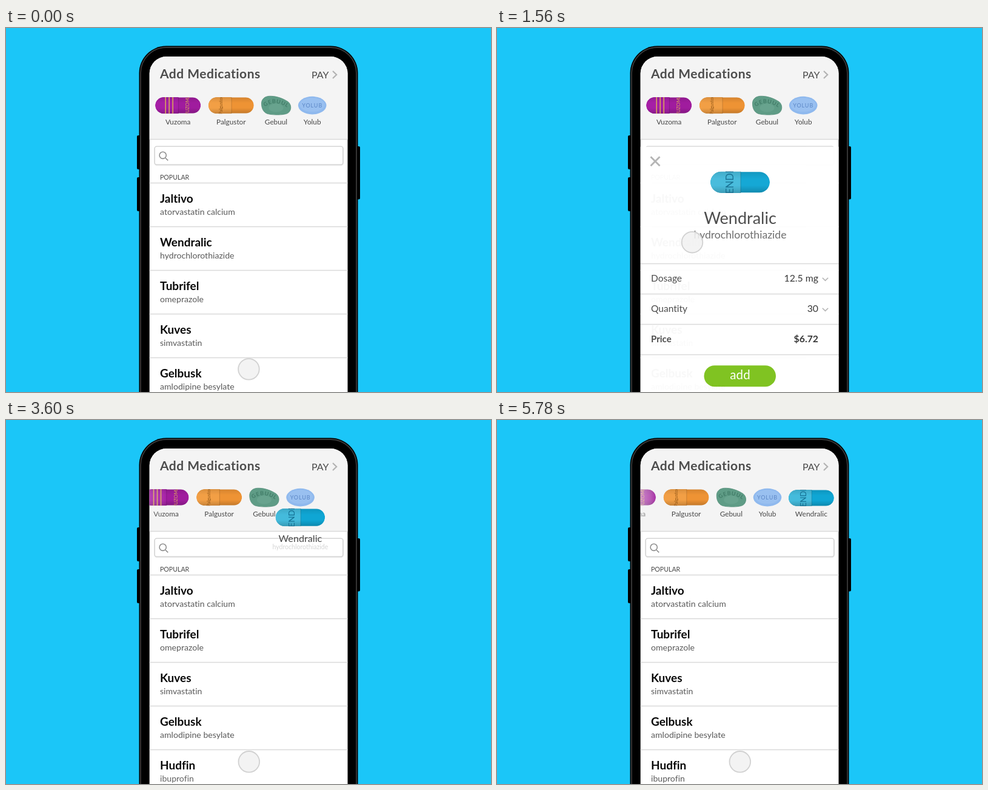
Recreate the animation shown at these times as an HTML page. Size 800 by 600 pixels, loop 5800 ms.

```html
<!DOCTYPE html>
<html lang="en">
<head>
<meta charset="utf-8">
<title>Add Medications</title>
<style>
  html, body { margin: 0; width: 100%; height: 100%; overflow: hidden; background: #1bc6f8; }
  svg { display: block; width: 100vw; height: 100vh; }
  text { font-family: Lato, "Open Sans", sans-serif; font-variant-ligatures: none; fill: #484848; }
  .bold { font-weight: 700; }
  .mid { text-anchor: middle; }
  .end { text-anchor: end; }
  .line { stroke: #d9d9d9; stroke-width: 1.5; }
  .icon { fill: none; stroke: #b3b3b3; stroke-width: 1.6; }
  .glass { stroke: #8e8e8e; }
</style>
</head>
<body>
<svg viewBox="0 0 800 600">
  <defs>
    <clipPath id="screen"><rect x="236.7" y="47" width="326.8" height="640" rx="28"/></clipPath>
    <clipPath id="capsule"><rect x="-37.5" y="-13.6" width="75" height="27.2" rx="13.6"/></clipPath>
    <linearGradient id="shade" x2="0" y2="1">
      <stop offset="0" stop-opacity=".1"/>
      <stop offset=".35" stop-opacity="0"/>
      <stop offset=".65" stop-opacity="0"/>
      <stop offset="1" stop-opacity=".18"/>
    </linearGradient>
    <linearGradient id="edge">
      <stop offset="0" stop-color="#f4f4f4" stop-opacity=".5"/>
      <stop offset=".6" stop-color="#f4f4f4" stop-opacity=".28"/>
      <stop offset="1" stop-color="#f4f4f4" stop-opacity="0"/>
    </linearGradient>
    <path id="arc" d="M-18.5 2.5Q-2 -11 20 4.5"/>
  </defs>

  <rect width="800" height="600" fill="#1bc6f8"/>
  <g>
    <rect x="216" y="177" width="9" height="56" rx="2"/>
    <rect x="216" y="246" width="9" height="56" rx="2"/>
    <rect x="575" y="195" width="9" height="87.5" rx="2"/>
    <rect x="219.5" y="29.5" width="361" height="700" rx="45"/>
    <rect x="222" y="32" width="356" height="700" rx="42.5" fill="none" stroke="#3a3a3a" stroke-width="1.8"/>
  </g>

  <g clip-path="url(#screen)">
    <rect x="236" y="47" width="328" height="553" fill="#fff"/>
    <rect id="hot" x="236" y="327.5" width="328" height="72" fill="#e8e8e8"/>
    <rect x="245.5" y="196" width="310.5" height="30" rx="3.5" fill="none" stroke="#ececec" stroke-width="2.5"/>
    <rect x="245.2" y="195.2" width="310.6" height="30" rx="3.5" fill="#fff" stroke="#cfcfcf" stroke-width="1.3"/>
    <path d="M263 214.2L267.2 218.4" class="icon glass"/>
    <circle cx="258.7" cy="209.8" r="5.6" class="icon glass"/>
    <text x="254" y="250.2" font-size="10.6">POPULAR</text>
    <g id="before"></g>
    <g id="after"></g>

    <g id="card">
      <rect x="236" y="184" width="328" height="430" fill="#fff"/>
      <path d="M253.5 200.5L268.5 215.5M268.5 200.5L253.5 215.5" class="icon" style="stroke-width:2.8"/>
      <g id="facts"></g>
      <rect id="button" x="341.5" y="544.5" width="118.5" height="35" rx="17.5"/>
      <text x="401" y="567.5" font-size="20.5" class="mid" letter-spacing=".2" style="fill:#fff">add</text>
    </g>

    <rect x="236" y="47" width="328" height="136" fill="#f4f4f4"/>
    <path d="M236 183.5H564" class="line"/>
    <text x="254" y="83" font-size="21" class="bold" letter-spacing=".5" style="fill:#4c4c4c">Add Medications</text>
    <text x="504" y="82.5" font-size="16">PAY</text>
    <path d="M539 71L545.2 77L539 83" class="icon" style="stroke-width:2.2"/>
    <g id="tray"></g>
    <rect id="fade" x="236" y="105" width="30" height="60" fill="url(#edge)"/>

    <text id="sub" class="mid" font-size="17.6" style="fill:#6a6a6a">hydrochlorothiazide</text>
    <text id="title" class="mid" font-size="27">Wendralic</text>
    <g id="pill"></g>
  </g>
  <circle id="dot" r="17.3" fill="#f2f2f2" stroke="#cfcfcf" stroke-width="1.8"/>
</svg>

<script>
const LOOP = 5800;
const el = id => document.getElementById(id);
const clamp = v => Math.min(1, Math.max(0, v));
const ramp = (t, start, length) => clamp((t - start) / length);
const out = (p, power) => 1 - Math.pow(1 - p, power);
const mix = (a, b, p) => a + (b - a) * p;
const set = (node, attrs) => { for (const k in attrs) node.setAttribute(k, attrs[k]); };

// Capsule centred on the origin, 75 by 27, with a slightly taller lettered cap on the left
function capsule(body, cap, ink, word, wordX, size, extra = '') {
  const fills = color => [color, 'url(#shade)'];
  const back = fills(body).map(f =>
    `<rect x="-37.5" y="-13" width="75" height="26" rx="13" fill="${f}"/>`).join('');
  const front = fills(cap).map(f =>
    `<path d="M.7 -13.6H-23.9A13.6 13.6 0 0 0 -23.9 13.6H.7Z" fill="${f}"/>`).join('');
  return `<g clip-path="url(#capsule)">${back}${front}
    <path d="M.7 -14V14" stroke="#000" stroke-opacity=".16"/>${extra}
    <text class="mid" transform="translate(${wordX} 0) rotate(-90)" font-size="${size}"
      style="fill:${ink}">${word}</text></g>`;
}

const stripes = [-20.5, -14.5, -8.5]
  .map(x => `<path d="M${x} -14V14" stroke="#d9a65c" stroke-width="1.6"/>`).join('');

const stone = `<path d="M-24 -1C-25 -11 -18 -16 -8 -15.3C2 -15 12 -11 19 -6.5C26 -2 26 9 19 13
    C12 16.5 -8 16 -15 13.5C-21 11 -23.5 5 -24 -1Z" fill="#5f9c86" stroke="#528d78" stroke-width=".8"/>
  <ellipse cx="0" cy="4" rx="12" ry="7" fill="#73ac97" opacity=".5"/>
  <text font-size="9" letter-spacing=".8" class="bold" style="fill:#427c68"><textPath href="#arc">GEBUUL</textPath></text>`;

const oval = `<ellipse rx="23.3" ry="14.8" fill="#8fb9ee"/>
  <ellipse cy="-1" rx="20.5" ry="11.5" fill="#9fc4f1" opacity=".7"/>
  <text y="3.2" class="mid" font-size="9" letter-spacing=".9" style="fill:#5c86c6">YOLUB</text>`;

const tray = [
  [283.7, 'Vuzoma', capsule('#a01c9e', '#a61fa6', '#d9a65c', 'VUZOMA', 18.5, 8, stripes)],
  [371.3, 'Palgustor', capsule('#ee9334', '#f29f45', '#8f5516', 'Palgustor', -14.5, 7.4)],
  [445.5, 'Gebuul', stone],
  [505.2, 'Yolub', oval]
];
el('tray').innerHTML = tray.map(([x, name, art]) =>
  `<g transform="translate(${x} 127.6)">${art}</g>
   <text x="${x}" y="158.5" class="mid" font-size="11.8">${name}</text>`).join('');

el('pill').innerHTML = capsule('#0fa6d4', '#44bbdc', '#146f92', 'WENDRA', -8.5, 12.5);

const drugs = [
  ['Jaltivo', 'atorvastatin calcium'],
  ['Wendralic', 'hydrochlorothiazide'],
  ['Tubrifel', 'omeprazole'],
  ['Kuves', 'simvastatin'],
  ['Gelbusk', 'amlodipine besylate'],
  ['Hudfin', 'ibuprofin']
];
const rows = list => list.slice(0, 5).map(([name, generic], i) => {
  const y = 255.5 + i * 72;
  return `<path d="M236 ${y}H564" class="line"/>
    <text x="254" y="${y + 32.5}" font-size="19" class="bold" style="fill:#080808">${name}</text>
    <text x="254" y="${y + 52}" font-size="14.1" style="fill:#5a5a5a">${generic}</text>`;
}).join('');
el('before').innerHTML = rows(drugs);
el('after').innerHTML = rows(drugs.filter((d, i) => i !== 1));

const facts = [['Dosage', '12.5 mg'], ['Quantity', '30'], ['Price', '$6.72']];
el('facts').innerHTML = facts.map(([label, value], i) => {
  const y = 376.7 + i * 50, last = i === 2;
  const cls = last ? 'bold' : '';
  const arrow = last ? '' : `<path d="M536.8 ${y + 23.3}L541.5 ${y + 28}L546.2 ${y + 23.3}" class="icon"/>`;
  return `<path d="M236 ${y}H564" class="line"/>
    <text x="254" y="${y + 29.5}" font-size="${last ? 15 : 15.5}" class="${cls}">${label}</text>
    <text x="530" y="${y + 29.5}" font-size="15.8" class="end ${cls}" style="fill:#333">${value}</text>${arrow}`;
}).join('') + '<path d="M236 526.7H564" class="line"/>';

const place = (id, x, y, scale, opacity) =>
  set(el(id), { transform: `translate(${x} ${y}) scale(${scale})`, opacity });

const press = (t, down, up) => ramp(t, down, 160) - ramp(t, up, 160);

function draw(t) {
  const enter = out(ramp(t, 1260, 510), 4);
  const leave = out(ramp(t, 3300, 480), 3);
  const fly = out(ramp(t, 3300, 873), 3);
  const scroll = out(ramp(t, 3518, 660), 3);
  const rest = 1 - enter;
  const rowPress = press(t, 920, 1260);
  const addPress = press(t, 2960, 3300);

  el('before').style.display = t < 3300 ? '' : 'none';
  el('after').style.display = t < 3300 ? 'none' : '';
  set(el('hot'), { opacity: rowPress });

  place('card', 0, 416 * (rest + leave), 1, enter * (1 - leave));
  set(el('button'), { fill: `rgb(${mix(125, 113, addPress)},${mix(194, 179, addPress)},${mix(28, 18, addPress)})` });

  const size = mix(1, 12 / 27, fly);
  const x = mix(401, 518.4, fly);
  place('pill', x, mix(242.5, 128.5, fly) + 416 * rest, mix(98 / 75, 1, fly), enter);
  place('title', x, mix(308.5, 158.5, fly) + 520 * rest, size, enter);
  place('sub', x, mix(332, 167, fly) + 520 * rest, size, enter * (1 - fly));

  set(el('tray'), { transform: `translate(${-59.2 * scroll} 0)` });
  set(el('fade'), { opacity: scroll });

  const go = out(ramp(t, 0, 650), 3) - out(ramp(t, 2035, 650), 3);
  const held = rowPress + addPress;
  set(el('dot'), {
    cx: mix(400.8, 322, go), cy: mix(563.3, 353.2, go),
    'fill-opacity': mix(.88, .3, held), 'stroke-opacity': mix(.95, .7, held)
  });
}

const began = performance.now();
function tick() {
  draw((performance.now() - began) % LOOP);
  requestAnimationFrame(tick);
}
tick();
</script>
</body>
</html>
```
